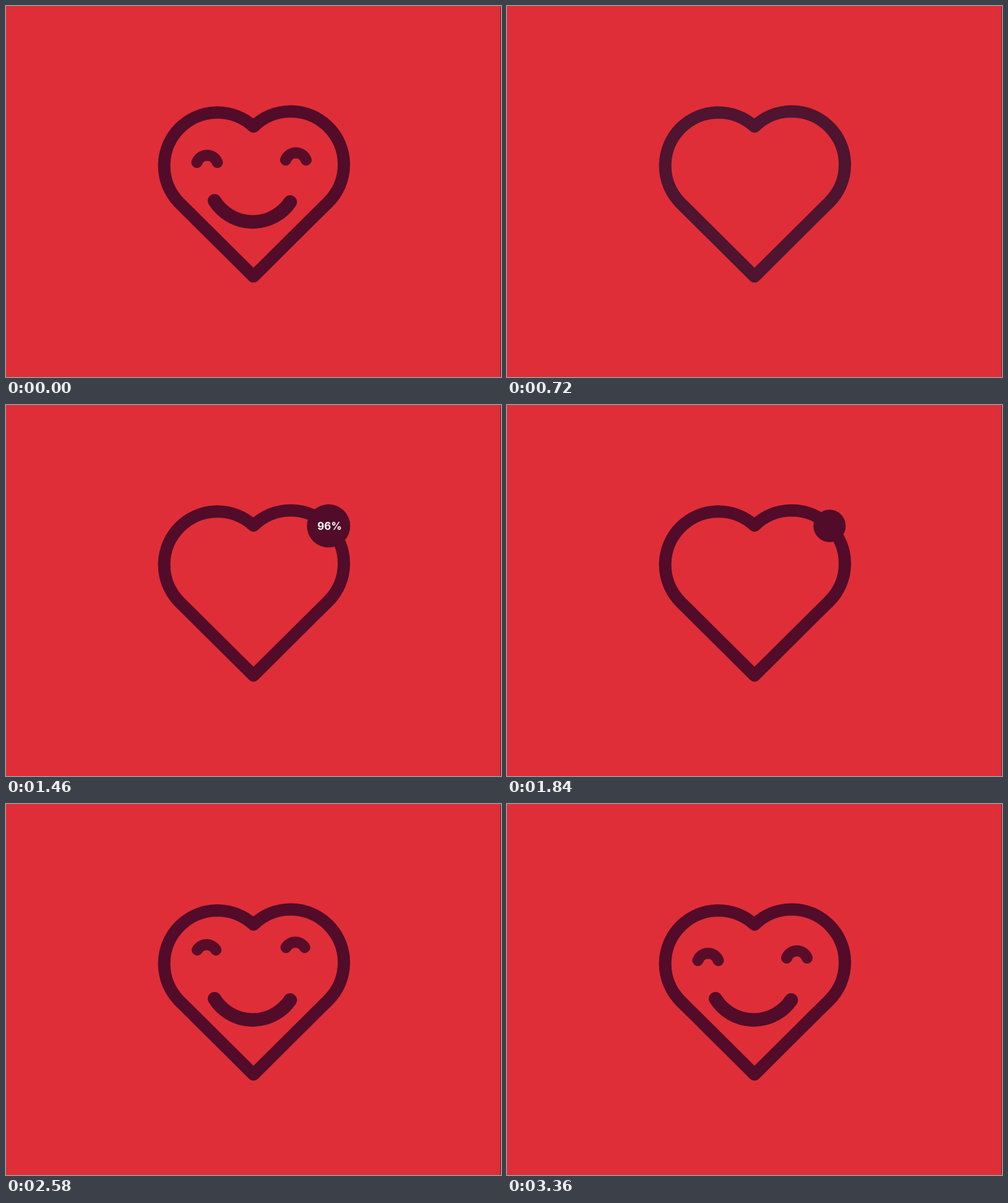
An HTML page for the animation above (3.6 s loop, 800 px wide and 600 px high).

```html
<!DOCTYPE html>
<html lang="en">
<head>
<meta charset="utf-8">
<title>Heart loader</title>
<style>
  html, body { margin: 0; width: 100%; height: 100%; overflow: hidden; background: #df2e37; }
  svg { display: block; width: 800px; height: 600px; }
  path { fill: none; stroke: #520b29; stroke-linecap: round; stroke-linejoin: round; }
  text { font: 700 17px Inter, sans-serif; fill: #fff; text-anchor: middle; }
</style>
</head>
<body>
<svg viewBox="0 0 800 600">
  <rect x="799" width="1" height="600" fill="#7d1a2b"/>
  <!-- drawn counter-clockwise, starting under the badge -->
  <path id="heart" pathLength="1" stroke-width="20"
    d="M521 195.7A86 86 0 0 0 400 195A86 86 0 0 0 279.2 317.3L400 437.3L520.8 317.3A86 86 0 0 0 521 195.7"/>
  <circle id="badge" cx="521.3" cy="195.5" fill="#520b29"/>
  <text id="label" x="523" y="201.7"></text>
  <path id="smile" pathLength="1" stroke-width="22" d="M337 315A73 73 0 0 0 459.3 317"/>
  <g id="eyes" opacity=".95">
    <path class="eye" pathLength="1" stroke-width="18" d="M308.5 253A17.6 17.6 0 0 1 341.5 253"/>
    <path class="eye" pathLength="1" stroke-width="18" d="M452 249A17.6 17.6 0 0 1 485 249"/>
  </g>
</svg>
<script>
  const LOOP = 3600;
  const [heart, badge, label, smile, eyes] =
    ['heart', 'badge', 'label', 'smile', 'eyes'].map(id => document.getElementById(id));
  const eyeArcs = document.querySelectorAll('.eye');

  const span = (t, from, to) => Math.min(1, Math.max(0, (t - from) / (to - from)));
  const smooth = x => x * x * (3 - 2 * x);
  const easeOut = (x, power) => 1 - (1 - x) ** power;
  const mix = (a, b, x) => a + (b - a) * x;

  const TEAL = [0, 180, 166], PLUM = [82, 11, 41];
  const blend = x => `rgb(${TEAL.map((c, i) => Math.round(mix(c, PLUM[i], x)))})`;

  // Shows a part of a path, growing from its start or its middle.
  function trim(path, amount, fromMiddle) {
    path.style.visibility = amount > 0 ? 'visible' : 'hidden';
    path.style.strokeDasharray = `${amount} 2`;
    path.style.strokeDashoffset = fromMiddle ? (amount - 1) / 2 : 0;
  }

  function draw(t) {
    if (t < 20) t = LOOP;

    trim(heart, smooth(span(t, 20, 700)));
    heart.style.stroke = blend(span(t, 20, 760));

    const grow = easeOut(span(t, 720, 1360), 3);
    const shrink = span(t, 1640, 2040) ** 2;
    badge.setAttribute('r', 35 * grow * (1 - shrink));
    label.textContent = Math.floor(100 * easeOut(span(t, 720, 1640), 2)) + '%';
    label.setAttribute('opacity', span(t, 740, 860) * (1 - span(t, 1640, 1760)));

    trim(smile, smooth(span(t, 2060, 2500)), true);

    const open = smooth(span(t, 2400, 2640));
    eyeArcs.forEach(arc => trim(arc, open, true));
    const lift = 14 * (1 - smooth(span(t, 2640, 3370)));
    eyes.setAttribute('transform', `translate(${-lift * 0.06} ${-lift})`);
  }

  function tick() {
    draw(performance.now() % LOOP);
    requestAnimationFrame(tick);
  }
  tick();
</script>
</body>
</html>
```
